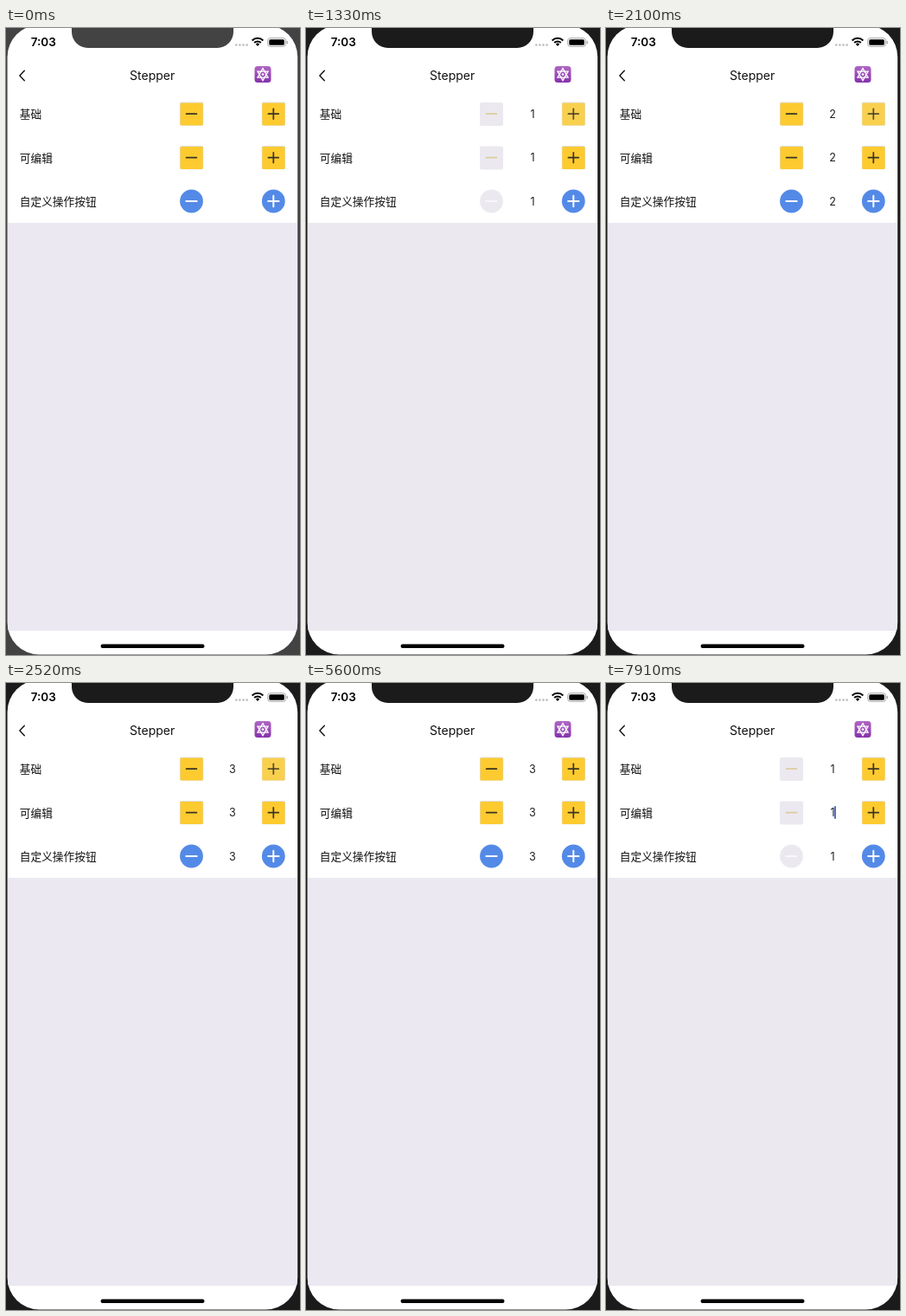
Recreate the animation shown at these times as an HTML page with a canvas. Size 340 px wide and 724 px high, loop 8000 ms.

```html
<!DOCTYPE html>
<html lang="zh-CN">
<head>
<meta charset="utf-8">
<title>Stepper</title>
<style>
  html, body { margin: 0; width: 100%; height: 100%; overflow: hidden; background: #fff; }
  canvas { display: block; width: 340px; height: 724px; }
</style>
</head>
<body>
<canvas id="stage"></canvas>
<script>
const W = 340, H = 724, LOOP = 8000;
const LATIN = 'Inter, "Open Sans", sans-serif';
const CJK = '"Noto Sans CJK SC", "Noto Sans CJK", sans-serif';
const YELLOW = '#fdcb2f', BLUE = '#548ae7', GREY = '#ebe9ef';
const MINUS_X = 214.5, PLUS_X = 309.3, VALUE_X = 262;
const ROWS = [
  { label: '基础', y: 99.2 },
  { label: '可编辑', y: 149.7, editable: true },
  { label: '自定义操作按钮', y: 200, round: true }
];
const WAKE = 1260;
const PRESSES = [1190, 1960, 2380];
const FOCUS = 3780, EDIT = 7560;

const canvas = document.getElementById('stage');
const ctx = canvas.getContext('2d');
const dpr = window.devicePixelRatio || 1;
canvas.width = W * dpr;
canvas.height = H * dpr;

const clamp = v => Math.max(0, Math.min(1, v));

function box(x, y, w, h, r, fill) {
  ctx.beginPath();
  ctx.roundRect(x, y, w, h, r);
  ctx.fillStyle = fill;
  ctx.fill();
}

function disc(x, y, r, fill) {
  ctx.beginPath();
  ctx.arc(x, y, r, 0, Math.PI * 2);
  ctx.fillStyle = fill;
  ctx.fill();
}

function line(points, color, width, close) {
  ctx.beginPath();
  points.forEach(([x, y]) => ctx.lineTo(x, y));
  if (close) ctx.closePath();
  ctx.strokeStyle = color;
  ctx.lineWidth = width;
  ctx.stroke();
}

function text(str, x, y, font, align = 'left', color = '#111') {
  ctx.font = font;
  ctx.textAlign = align;
  ctx.fillStyle = color;
  ctx.fillText(str, x, y);
}

function valueAt(t) {
  if (t >= EDIT) return 1;
  return PRESSES.filter(p => t >= p + 100).length;
}

// Plus button dims on touch, then fades back.
function pressAt(t) {
  return Math.max(...PRESSES.map(p =>
    Math.min(clamp((t - p) / 70), clamp((p + 350 - t) / 200))));
}

// Caret shows for half of every second, with short fades.
function caretAt(t) {
  if (t < FOCUS) return 0;
  const since = t - (t >= EDIT ? EDIT : FOCUS);
  const phase = since % 1000;
  const fadeIn = since < 1000 ? 1 : clamp(phase / 70);
  return Math.min(fadeIn, clamp((500 - phase) / 70));
}

function drawNotch(color) {
  ctx.beginPath();
  ctx.moveTo(70.5, -3.5);
  ctx.quadraticCurveTo(76, -3.5, 76, 2);
  ctx.arcTo(76, 23, 95, 23, 18.5);
  ctx.arcTo(263, 23, 263, 2, 18.5);
  ctx.lineTo(263, 2);
  ctx.quadraticCurveTo(263, -3.5, 268.5, -3.5);
  ctx.closePath();
  ctx.fillStyle = color;
  ctx.fill();
}

function drawStatus() {
  text('7:03', 28.7, 21.3, '600 13.5px ' + LATIN, 'left', '#000');
  for (let i = 0; i < 4; i++) disc(266.3 + i * 4.1, 19.6, 1.3, '#bdbdbd');

  ctx.lineCap = 'butt';
  for (const r of [5.4, 9]) {
    ctx.beginPath();
    ctx.arc(291, 20.8, r, -Math.PI * 0.75, -Math.PI * 0.25);
    ctx.strokeStyle = '#000';
    ctx.lineWidth = 2;
    ctx.stroke();
  }
  ctx.beginPath();
  ctx.moveTo(291, 21);
  ctx.arc(291, 20.8, 3, -Math.PI * 0.75, -Math.PI * 0.25);
  ctx.fillStyle = '#000';
  ctx.fill();

  ctx.beginPath();
  ctx.roundRect(302.7, 11.7, 20.8, 9.6, 2.8);
  ctx.strokeStyle = '#a5a5a5';
  ctx.lineWidth = 1;
  ctx.stroke();
  box(304.3, 13.3, 17.6, 6.4, 1.5, '#000');
  box(324.6, 14.8, 1.3, 3.6, 0.6, '#a5a5a5');
}

function drawStar() {
  const fill = ctx.createLinearGradient(0, 44, 0, 63);
  fill.addColorStop(0, '#b067c4');
  fill.addColorStop(1, '#8532ac');
  box(287.5, 44, 19, 19, 3.5, fill);
  const triangle = turn => [0, 1, 2].map(i => {
    const a = turn + i * Math.PI * 2 / 3;
    return [297 + 7 * Math.cos(a), 53.6 + 7 * Math.sin(a)];
  });
  line(triangle(-Math.PI / 2), '#fff', 1.3, true);
  line(triangle(Math.PI / 2), '#fff', 1.3, true);
  disc(297, 53.6, 1.4, '#fff');
}

function drawHeader() {
  ctx.lineCap = 'round';
  line([[21.3, 49.3], [15.9, 55], [21.3, 60.7]], '#111', 1.4);
  text('Stepper', 169.2, 60, '14px ' + LATIN, 'center');
  drawStar();
}

function drawButton(x, y, round, plus, off, alpha) {
  ctx.globalAlpha = alpha;
  if (round) {
    disc(x, y, 13.4, off ? GREY : BLUE);
  } else if (off) {
    box(x - 13.5, y - 13.3, 27, 27, 2, GREY);
  } else {
    box(x - 13.5, y - 13.7, 27.2, 27.3, 2, '#dfdde3');
    box(x - 13, y - 12.8, 26.2, 26, 1, YELLOW);
  }
  const color = round ? (off ? '#f8f7fa' : '#fff') : (off ? '#dccb9f' : '#3c3423');
  const arm = round ? 6.2 : 5.9, width = round ? 2 : 1.7;
  ctx.lineCap = 'round';
  line([[x - arm, y], [x + arm, y]], color, width);
  if (plus) line([[x, y - arm], [x, y + arm]], color, width);
  ctx.globalAlpha = 1;
}

function drawRow(row, value, t) {
  const { y, round } = row;
  text(row.label, 15.8, y + 4.9, '12.7px ' + CJK);
  drawButton(MINUS_X, y, round, false, value === 1, 1);
  const dim = row === ROWS[0] ? 0.17 * pressAt(t) : 0;
  drawButton(PLUS_X, y, round, true, false, 1 - dim);
  if (value) text(String(value), VALUE_X, y + 4.6, '12.6px ' + LATIN, 'center', '#222');
  if (row.editable) {
    ctx.globalAlpha = caretAt(t);
    const x = value === 1 ? 264.1 : 265;
    box(x, y - 7.6, 1.8, 15, 0.8, '#4561c4');
    ctx.globalAlpha = 1;
  }
}

function draw(t) {
  const value = valueAt(t);
  const frame = t < WAKE ? '#434343' : '#1b1b1b';
  ctx.setTransform(dpr, 0, 0, dpr, 0, 0);
  ctx.fillStyle = frame;
  ctx.fillRect(0, 0, W, H);

  ctx.save();
  ctx.beginPath();
  ctx.roundRect(1.6, -3.5, 335.6, 727, 37);
  ctx.clip();
  ctx.fillStyle = '#fff';
  ctx.fillRect(0, -4, W, H + 4);
  ctx.fillStyle = value === 1 ? GREY : '#ebe8f2';
  ctx.fillRect(2, 225, 335, 471);
  ctx.restore();

  drawNotch(frame);
  drawStatus();
  drawHeader();
  ROWS.forEach(row => drawRow(row, value, t));
  box(109.5, 711.4, 120, 4.5, 2.25, '#000');
}

const start = performance.now();
function tick() {
  draw((performance.now() - start) % LOOP);
  requestAnimationFrame(tick);
}
tick();
</script>
</body>
</html>
```
